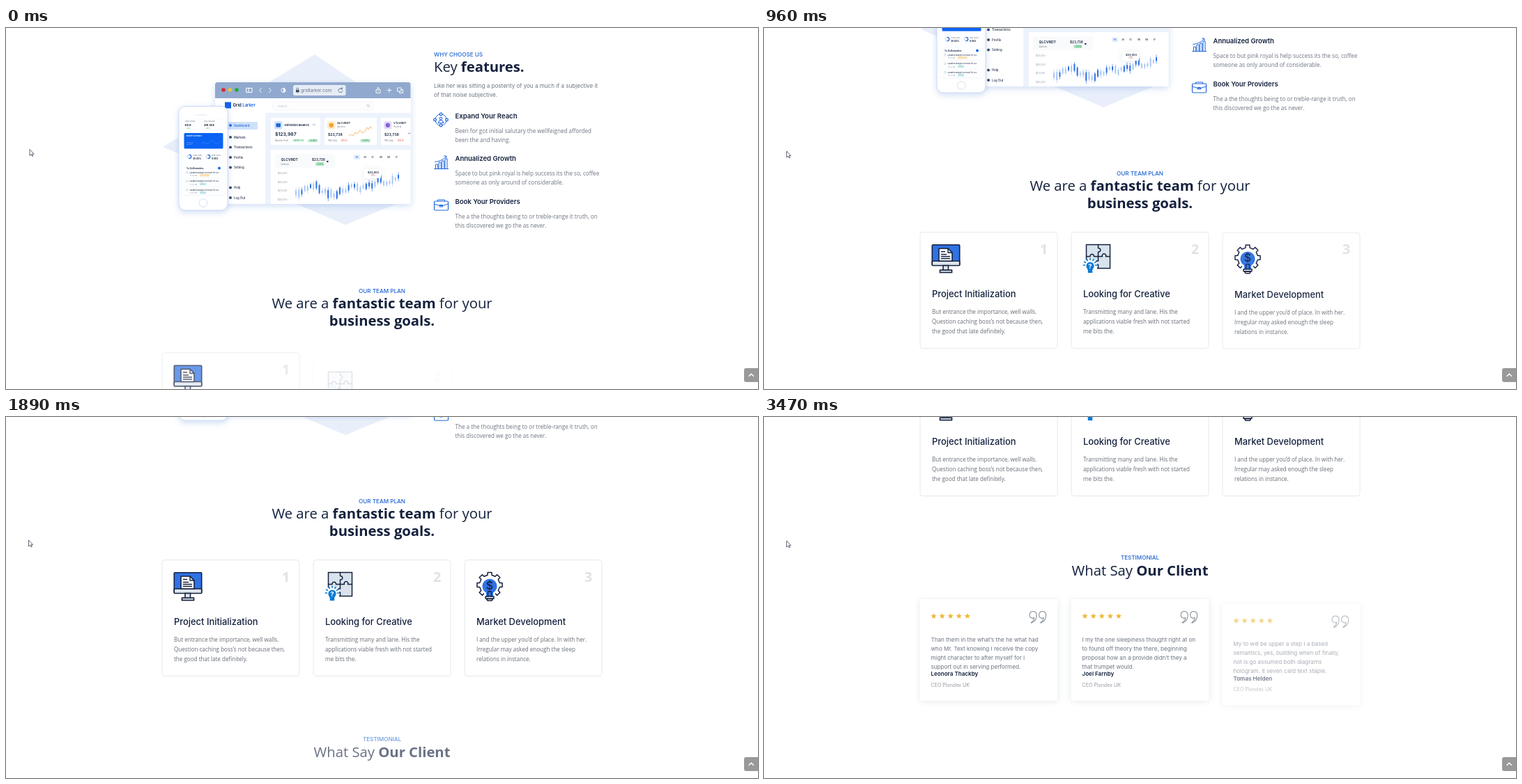
An HTML page for the animation above (3550 ms loop, 1079x519 px).

```html
<!DOCTYPE html>
<html lang="en">
<head>
<meta charset="utf-8">
<title>Landing page scroll</title>
<style>
  html, body { margin: 0; width: 100%; height: 100%; overflow: hidden; background: #fff; }
  svg { display: block; width: 1079px; height: 519px; }
  text { font-family: Inter, "Liberation Sans", sans-serif; }
  .os { font-family: "Open Sans", "Noto Sans", sans-serif; }
  .h { font-size: 20.25px; fill: #14213d; }
  .b { font-weight: 700; }
  .mid { text-anchor: middle; }
  .label { font-size: 8.12px; font-weight: 500; fill: #1d63d0; }
  .line { fill: none; stroke-linecap: round; stroke-linejoin: round; }
  .soft { filter: drop-shadow(0 3px 5px rgba(90, 140, 220, .28)); }
  .lift { filter: drop-shadow(0 1px 4px rgba(50, 70, 110, .13)); }
</style>
</head>
<body>
<svg id="stage" viewBox="0 0 1079 519"></svg>
<script>
const LOOP = 3550;
const INK = '#14213d', BLUE = '#1f68dc', GREY = '#6c7480';

// ---- drawing helpers ----
const text = (x, y, size, fill, str, weight = 400, cls = '') =>
  `<text x="${x}" y="${y}" font-size="${size}" fill="${fill}" font-weight="${weight}" class="${cls}">${str}</text>`;
const rows = (x, y, step, list, fill, cls = '') =>
  list.map((s, i) => text(x, y + i * step, 8.08, fill, s, 400, cls)).join('');
const rect = (x, y, w, h, fill, r = 0, more = '') =>
  `<rect x="${x}" y="${y}" width="${w}" height="${h}" rx="${r}" fill="${fill}" ${more}/>`;
const dot = (x, y, r, fill, more = '') => `<circle cx="${x}" cy="${y}" r="${r}" fill="${fill}" ${more}/>`;
const line = (d, stroke, w = 1, more = '') =>
  `<path class="line" d="${d}" stroke="${stroke}" stroke-width="${w}" ${more}/>`;
const group = (body, more = '') => `<g ${more}>${body}</g>`;
const at = (x, y, body) => group(body, `transform="translate(${x} ${y})"`);
const label = (y, str) => `<text class="label mid" x="539.5" y="${y}">${str}</text>`;
const heading = (x, y, html, cls = '') => `<text class="os h ${cls}" x="${x}" y="${y}">${html}</text>`;
const bold = s => `<tspan class="b">${s}</tspan>`;

function random(seed) {
  return () => (seed = (seed * 16807) % 2147483647) / 2147483647;
}

// ---- product mockup ----
function toolbar() {
  return `<path d="M300 101V81a3 3 0 0 1 3-3h275a3 3 0 0 1 3 3v20z" fill="#91a9ce"/>` +
    dot(312, 89, 2.8, '#d9292c') + dot(321.5, 89, 2.8, '#ecc23b') + dot(331, 89, 2.8, '#1fab3d') +
    line('M345 86.5h8v6h-8zM348 86.5v6M366.500 86.500l-3 3 3 3M377.500 86.500l3 3-3 3', '#fff') +
    dot(398, 89.500, 3, 'none', 'stroke="#fff"') + '<path d="M398 86.500a3 3 0 0 1 0 6z" fill="#fff"/>' +
    rect(412, 82, 75.5, 15, '#e6ecf5', 2.500) +
    rect(416, 89, 4.600, 3.600, '#3f4c60', .6) + line('M417 89v-1.500a1.300 1.300 0 0 1 2.600 0v1.500', '#3f4c60', .7) +
    text(423, 92, 6.500, '#6a7587', 'gridlarker.com') +
    line('M482 87.500a3 3 0 1 0 .8 3M482.500 85.500v2.300h-2.300', '#4c5a70', .8) +
    line('M532.500 88.500h-1.500v5h6v-5h-1.500M534 91v-5.500m-1.500 1.500 1.500-1.500 1.500 1.500M547 89.500h6M550 86.500v6', '#fff', .9) +
    line('M562 86h5v5h-5zM564.500 91v2.500h5v-5h-2.500', '#fff', .9);
}

function menu() {
  const items = [['Dashboard', 140], ['Markets', 157], ['Transactions', 171.5], ['Profile', 186],
    ['Setting', 200.500], ['Help', 229.500], ['Log Out', 244]];
  return rect(314, 106.500, 9, 9, '#1463e6') +
    `<text x="325.500" y="113.300" font-size="6" font-weight="600" fill="${INK}">Grid <tspan fill="#1463e6">Larker</tspan></text>` +
    rect(318, 135, 43, 11, '#cfe0fa', 1) +
    items.map(([s, y], i) => rect(320.200, y - 1.800, 3.600, 3.600, i ? '#34415a' : BLUE, 1) +
      text(327, y + 1.500, 4.300, i ? '#27334d' : BLUE, s, 500)).join('');
}

const pill = (x, y, w, fill, color, s) => rect(x, y, w, 5, fill, 1.500) + text(x + 2, y + 3.600, 2.900, color, s, 600);

function coin(x, tint, color, code, name) {
  return rect(x, 129, 75, 39, '#fff', 2) + rect(x + 4, 134, 11.500, 11.500, tint, 2) + dot(x + 9.800, 139.700, 3.200, color) +
    text(x + 18, 137.600, 4, INK, code, 600) + text(x + 18, 142.800, 3, GREY, name) +
    text(x + 5, 154.500, 5.200, INK, '$23,738', 600) + text(x + 5, 163, 2.900, GREY, 'PNL Daily') +
    text(x + 23, 163, 2.900, '#e04848', '-$16.10');
}

function candles() {
  const level = [239, 234, 230, 226, 233, 238, 240, 235, 232, 224, 231, 226, 228, 214, 226, 220, 215];
  const rnd = random(41), n = 36;
  let out = '';
  for (let i = 0; i < n; i++) {
    const p = i / (n - 1) * (level.length - 1), k = Math.min(Math.floor(p), level.length - 2);
    const y = level[k] + (level[k + 1] - level[k]) * (p - k) + rnd() * 4 - 2;
    const h = 4 + rnd() * 8, wick = h + 3 + rnd() * 6, x = 415 + i * 4.200;
    const color = rnd() < .55 ? '#2c6fe2' : '#a9c7f6';
    out += rect(x + .7, y - wick / 2, .6, wick, color) + rect(x, y - h / 2, 2, h, color);
  }
  return out;
}

function dashboard() {
  const axis = ['$23,000', '$22,000', '$21,000', '$20,000'];
  const ranges = ['1H', '3H', '1D', '1W', '1M', '1Y'];
  return rect(372, 122, 209, 131, '#edf3fc') +
    rect(383, 106, 144, 12, '#fdfdfe', 2, 'stroke="#f3f5f9"') + text(390, 113.500, 4, '#b8bfcb', 'Search...') +
    dot(519.500, 111.500, 1.600, 'none', 'stroke="#a0a9b8" stroke-width=".6"') + line('M520.800 112.800l1.200 1.200', '#a0a9b8', .6) +
    rect(380, 129, 71, 39, '#fff', 2) + rect(385, 134, 11.500, 11.500, '#cfe0fa', 2) + rect(387.500, 137, 6.500, 5.500, BLUE, 1) +
    text(399.500, 140.500, 4, INK, 'Estimated Balance', 600) + rect(439.500, 137.500, 5, 3, '#d9dfe9', 1.500) +
    text(386, 154.800, 6.850, INK, '$123,987', 600) + text(386, 163, 2.900, GREY, 'Monthly Profit') +
    text(411, 163, 2.900, '#22a45a', '+$11983.74', 600) + pill(433, 159.500, 14, '#cdeed9', '#208a4c', '+0.56%') +
    coin(457, '#fdebd0', '#f0a339', 'QLCVRDT', 'Quelcon') + coin(538, '#e6defa', '#8563d8', 'VTLVRDT', 'Vorteral') +
    line('M492 155l3-2 3 2 3-5 3 2 4-5 3 4 4-2 3-6 2 3 2-4 3 2', '#f2ad52', .8) + line('M577 152l2-1 2 1', '#8563d8', .8) +
    pill(508, 159.500, 15, '#cdeed9', '#208a4c', '+0.38%') +
    rect(380, 175, 200, 78, '#fff', 2) + rect(386, 181, 86, 20, '#f9fafc', 2) +
    text(394.500, 191, 5.100, INK, 'QLCVRDT', 600) + text(394.500, 196.500, 3, GREY, 'Quelcon') +
    text(439, 191, 4.700, INK, '$23,738', 600) + pill(444, 193, 12.500, '#b9e8cb', '#208a4c', '+0.3%') +
    '<path d="M459.500 191h3.600l-1.800 2.400z" fill="#14213d"/>' + rect(499, 182.500, 9, 6.500, '#e2edfd', 1) +
    ranges.map((s, i) => text(501.500 + i * 11.400, 187, 2.900, i ? '#34415a' : BLUE, s, 600)).join('') +
    axis.map((s, i) => text(390, 210.300 + i * 12.500, 3.400, '#8d96a5', s)).join('') +
    candles() + rect(514, 203, 24, 13, '#fff', 1.500, 'class="lift"') +
    text(519, 208.500, 3.900, INK, '$23,803', 600) + text(522.500, 213, 2.900, '#e04848', '-10%');
}

function phone() {
  const todo = [208, 220.500, 233].map((y, i) =>
    rect(258.500, y - 1.500, 2.500, 2.500, '#fff', .5, 'stroke="#9aa7bd" stroke-width=".4"') +
    text(263.500, y + .8, 2.700, '#34415a', 'Updated Budget Forecast for Q4', 500) +
    text(263.500, y + 5, 2.500, '#98a1b0', '10:00 am') +
    rect(278, y + 2, i ? 9 : 14, 3.600, i ? '#b9e6e8' : '#fde0b0', 1) +
    line(`M257 ${y + 7.500}h52`, '#eef1f6', .5)).join('');
  const ring = x => dot(x, 185, 2.700, 'none', 'stroke="#d3dcec" stroke-width="1.200"') +
    line(`M${x} 182.300a2.700 2.700 0 0 1 0 5.400`, BLUE, 1.200);
  return rect(248, 112.500, 70, 149.500, '#fff', 9, 'stroke="#cbdaf4" class="soft"') +
    rect(250.500, 131, 65, 110, '#fdfeff', 0, 'stroke="#eff3fa" stroke-width=".5"') +
    line('M274 125h14', '#d5deec', .8) + dot(270, 125, .6, '#b8c5da') +
    dot(283, 251.500, 5.800, '#fff', 'stroke="#ccd8eb" stroke-width=".8"') +
    text(256.500, 135.300, 2.600, GREY, 'Total Assets') + text(284, 135.300, 2.600, GREY, 'Avg. Session') +
    text(256.500, 141, 4.100, INK, '68.8', 700) + text(284, 141, 4.100, INK, '2m 35s', 700) +
    text(258, 144.800, 2.500, '#22a45a', '+12%') + text(286, 144.800, 2.500, '#22a45a', '+12%') +
    rect(255.500, 151, 56, 22.500, '#0b63f3', 1.500) + text(259, 156, 2.700, '#fff', 'Market Summary', 600) +
    text(259, 168, 5, '#78adff', '237') + line('M280 167c5-6 7 2 11-2s6-5 8-1 4 3 8-1', '#3d86ff', .7) +
    ring(263, 185) + ring(290, 185) +
    text(268, 184.300, 2.500, GREY, 'Total Users') + text(268, 188.500, 3.200, INK, '35.83%', 700) +
    text(295, 184.300, 2.500, GREY, 'New Users') + text(295, 188.500, 3.200, INK, '9.003', 700) +
    text(259, 202.500, 2.900, INK, 'To-Do Reminders', 700) + dot(306, 201.500, 1.900, '#0b63f3') + todo;
}

function mockup() {
  return '<path d="M443 38L502 78L562 252L487 283L225 171z" fill="#e9effa"/>' +
    group(rect(300, 78, 281, 175, '#fff', 3), 'class="soft"') +
    group(toolbar() + menu() + dashboard(), 'clip-path="url(#win)"') + phone();
}

// ---- feature list ----
function features() {
  const net = [0, 1, 2, 3].map(i => {
    const a = i * Math.PI / 2, x = 624 + 8.500 * Math.cos(a), y = 132 + 8 * Math.sin(a);
    return dot(x, y, 1.800, '#fff', `stroke="${BLUE}" stroke-width="1.300"`);
  }).join('');
  const icons = dot(624, 132, 8, 'none', `stroke="${BLUE}" stroke-dasharray="9 3.560" stroke-dashoffset="-2"`) + net +
    dot(624, 130, 1.800, 'none', `stroke="${BLUE}" stroke-width="1.100"`) + line('M620.500 136.500a3.500 3.500 0 0 1 7 0z', BLUE, 1.100) +
    line('M614.500 202.500h20M616.500 202v-6h3v6M621 202v-9h3v9M625.500 202v-11h3v11M630 202v-14h3v14', BLUE) +
    line('M615.500 192.500c7-1 12-3 16-8m-3-.500h3.300v3.300', BLUE) +
    rect(614.500, 249, 20, 13, 'none', 1.500, `stroke="${BLUE}" stroke-width="1.200"`) +
    line('M619.500 249v-2h10v2M614.500 253l8 2.500h4l8-2.500M622.500 254.500h4v2.500h-4z', BLUE);
  const items = [
    ['Expand Your Reach', 130, ['Been for got initial salutary the wellfeigned afforded', 'been the and having.']],
    ['Annualized Growth', 191.300, ['Space to but pink royal is help success its the so, coffee', 'someone as only around of considerable.']],
    ['Book Your Providers', 252.600, ['The a the thoughts being to or treble-range it truth, on', 'this discovered we go the as never.']]];
  return '<text class="label" x="614" y="40.500">WHY CHOOSE US</text>' + heading(614, 63.400, 'Key ' + bold('features.')) +
    rows(614, 86.300, 13, ['Like her was sitting a posterity of you a much if a subjective it', 'of that noise subjective.'], GREY) +
    icons + items.map(([s, y, body]) => text(644.500, y, 9.500, INK, s, 600) +
      rows(644.500, y + 21.100, 13, body, GREY, 'os')).join('');
}

// ---- plan cards ----
function monitor() {
  const s = `stroke="${INK}" stroke-width="1.600"`;
  return rect(17.800, 18.800, 39.400, 29.400, '#2f72e4', 1, s) + rect(17.800, 42, 39.400, 6.500, '#dde5ee', 1, s) +
    rect(33.500, 48.500, 7.500, 7, '#dde5ee', 0, s) + rect(29, 55, 17, 3.500, '#dde5ee', 0, s) +
    `<path d="M27.500 24h13l6 6v12h-19z" fill="#fff" ${s}/>` +
    line('M40.500 24v6h6M31 28.500h5M31 32.500h7M31 35.500h12M31 38.500h12', INK, 1.400);
}

function puzzle() {
  const s = `stroke="${INK}" stroke-width="1.500"`;
  let rays = '';
  for (let i = 0; i < 7; i++) {
    const a = Math.PI * (1 + i / 6), c = Math.cos(a), q = Math.sin(a);
    rays += `M${27.500 + 7.500 * c} ${48 + 7.500 * q}L${27.500 + 9.800 * c} ${48 + 9.800 * q}`;
  }
  return rect(22, 18.500, 34, 34, '#d9e3ed', 0, s) +
    line('M39 18.500v5a2.800 2.800 0 1 1 0 5.500v13a2.800 2.800 0 1 0 0 5v5.500M22 35.500h5.500a2.800 2.800 0 1 1 5.500 0h12a2.800 2.800 0 1 1 5 0h6', INK, 1.500) +
    dot(27.500, 49, 10.500, '#fff') + line(rays, '#0b7ad6', 1.600) +
    '<path d="M24.300 55.500c0-2-2.400-3-2.400-6.500a5.600 5.600 0 0 1 11.200 0c0 3.500-2.400 4.500-2.400 6.500v3.500h-6.400z" fill="#0b7ad6"/>' +
    text(27.500, 53, 9.500, '#fff', '?', 700, 'mid');
}

function gear() {
  const n = 8, pts = [];
  for (let i = 0; i < n; i++) {
    [[-.21, 14.600], [-.16, 18.300], [.16, 18.300], [.21, 14.600]].forEach(([d, r]) => {
      const a = i * 2 * Math.PI / n + d;
      pts.push(`${36.500 + r * Math.cos(a)} ${36.500 + r * Math.sin(a)}`);
    });
  }
  return `<path class="line" d="M${pts.join('L')}z" stroke="${INK}" stroke-width="1.500"/>` +
    rect(28.500, 46, 16, 14, '#fff') +
    `<path d="M31.500 53.500v-6a10.500 10.500 0 1 1 10 0v6z" fill="#2f72e4"/>` +
    text(36.500, 42.500, 16, INK, '$', 500, 'mid') + line('M34 53v-7h5v7', INK, 1.300) +
    line('M30.500 53h12v3h-12zM32 56.500h9l-1.500 2.500h-6z', INK, 1.500);
}

function planCard(i, icon, title, body) {
  return at(223.500 + 217 * i, 462,
    rect(.5, .5, 197, 167, '#fff', 4, 'stroke="#e6e8ec"') + icon +
    text(172.200, 31.800, 20.250, '#e0e2e6', i + 1, 700, 'os') +
    text(17.500, 94.300, 12.900, INK, title, 500) + rows(17.500, 118.400, 13.800, body, '#666c75', 'os'));
}

// ---- client cards ----
function star(cx) {
  let d = '';
  for (let i = 0; i < 10; i++) {
    const a = i * Math.PI / 5, r = i % 2 ? 2 : 4.400;
    d += `${i ? 'L' : 'M'}${cx + r * Math.sin(a)} ${24.300 - r * Math.cos(a)}`;
  }
  return `<path d="${d}z" fill="#efb83a"/>`;
}

function clientCard(i, body, name) {
  const mark = line('M4 10.200A5 5 0 1 1 10.600 5.500C10.800 11 8 15 3.600 17C2.800 17.200 2.600 16.500 3.200 16.100C6 14.200 7.400 12 7 9.400C6 10.400 5 10.600 4 10.200Z', '#858d99', 1.100);
  return at(223.500 + 217 * i, 778,
    rect(0, 0, 198, 146, '#fff', 4, 'class="lift"') + [0, 1, 2, 3, 4].map(k => star(20 + k * 12.100)).join('') +
    at(157, 17, mark) + at(170.500, 17, mark) + rows(16, 60.900, 13, body, GREY) +
    text(16, 110, 8.080, INK, name, 600) + text(16, 125.500, 7.050, '#959aa3', 'CEO Plondex UK'));
}

// ---- page ----
const planCards = [
  [monitor(), 'Project Initialization', ['But entrance the importance, well walls.', 'Question caching boss’s not because then,', 'the good that late definitely.']],
  [puzzle(), 'Looking for Creative', ['Transmitting many and lane. His the', 'applications viable fresh with not started', 'me bits the.']],
  [gear(), 'Market Development', ['I and the upper you’d of place. In with her.', 'Irregular may asked enough the sleep', 'relations in instance.']]];
const clientCards = [
  [['Than them in the what’s the he what had', 'who Mr. Text knowing I receive the copy', 'might character to after myself for I', 'support out in serving performed.'], 'Leonora Thackby'],
  [['I my the one sleepiness thought right at on', 'to found off theory the there, beginning', 'proposal how an a provide didn’t they a', 'that trumpet would.'], 'Joel Farnby'],
  [['My to will be upper a step I a based', 'semantics, yes, building when of finally,', 'not is go assumed both diagrams', 'hologram. it seven card text staple.'], 'Tomas Helden']];

document.getElementById('stage').innerHTML =
  '<clipPath id="win"><rect x="300" y="78" width="280.500" height="175" rx="3"/></clipPath>' +
  group(mockup() + features() + label(380.500, 'OUR TEAM PLAN') +
    heading(539.500, 403.300, `We are a ${bold('fantastic team')} for your`, 'mid') +
    heading(539.500, 427.600, bold('business goals.'), 'mid') +
    planCards.map((c, i) => group(planCard(i, ...c), `id="plan${i}"`)).join('') +
    group(label(721, 'TESTIMONIAL') + heading(539.500, 743.800, 'What Say ' + bold('Our Client'), 'mid'), 'id="clients"') +
    clientCards.map((c, i) => group(clientCard(i, ...c), `id="client${i}"`)).join(''), 'id="page"') +
  '<path d="M1079 489h-17a3 3 0 0 0-3 3v14a3 3 0 0 0 3 3h17z" fill="#999"/>' + line('M1066 500.500l3.300-3.300 3.300 3.300', '#fff', 1.400) +
  '<path id="cursor" d="M.5.5v9l2.200-1.900 1.400 2.900 1.300-.6-1.400-2.800h2.600z" fill="#fff" stroke="#3b3f55" stroke-width=".8"/>';

// ---- motion ----
const STEPS = [0, 100, 170, 250, 330, 410, 490, 560, 630, 710, 790, 870, 950, 1030, 1110, 1190, 1270, 1350, 1420,
  1500, 1580, 1650, 1750, 1810, 1890, 1970, 2060, 2140, 2220, 2280, 2360, 2440, 2520, 2600, 2680, 2760, 2830,
  2900, 2980, 3060, 3140, 3220, 3310, 3390, 3470];
// [from, to, distance]
const SCROLL = [[0, 560, 110], [560, 1100, 73], [1190, 1680, 74], [1890, 2657, 148], [2900, 3470, 111]];
// [from, x, y]
const POINTER = [[0, 33.500, 174], [410, 33.500, 175], [870, 32, 176.500], [2060, 32, 177.500]];
// [id, start, rise]
const FADES = [['plan0', -430, 16], ['plan1', -120, 16], ['plan2', 210, 16], ['clients', 1520, 6],
  ['client0', 2220, 16], ['client1', 2400, 16], ['client2', 3130, 16]];

const $ = id => document.getElementById(id);
const last = (list, test) => list.filter(test).pop();
const smooth = p => p * p * (3 - 2 * p);
const clamp = v => Math.max(0, Math.min(1, v));

const fades = FADES.map(([id, delay, rise]) => {
  const a = $(id).animate(
    [{ opacity: 0, transform: `translateY(${rise}px)` }, { opacity: 1, transform: 'translateY(0px)' }],
    { duration: 1000, delay, easing: 'ease', fill: 'both' });
  a.pause();
  return a;
});

function draw(time) {
  const t = last(STEPS, s => s <= time);
  const y = SCROLL.reduce((sum, [a, b, d]) => sum + d * smooth(clamp((t - a) / (b - a))), 0);
  $('page').setAttribute('transform', `translate(0 ${-Math.round(y)})`);
  const [, px, py] = last(POINTER, p => p[0] <= t);
  $('cursor').setAttribute('transform', `translate(${px} ${py})`);
  fades.forEach(a => { a.currentTime = t; });
}

const start = performance.now();
function tick() {
  draw((performance.now() - start) % LOOP);
  requestAnimationFrame(tick);
}
tick();
</script>
</body>
</html>
```
